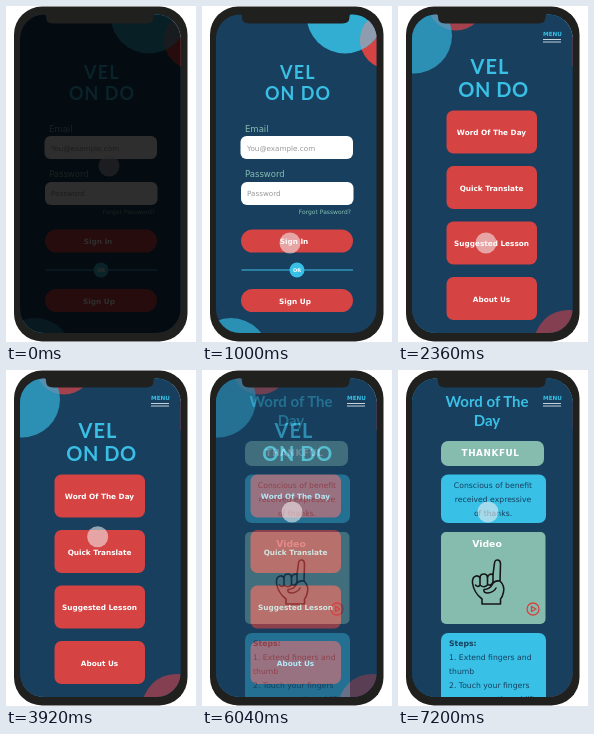
Animation, 190 px wide and 336 px high, one loop 8 s. Source, as an HTML page:

```html
<!DOCTYPE html>
<html lang="en">
<head>
<meta charset="utf-8">
<title>Phone app demo</title>
<style>
  html, body { margin: 0; width: 100%; height: 100%; overflow: hidden; background: #fff; }
  svg { display: block; width: 100vw; height: 100vh; }
  text { font-family: "DejaVu Sans", sans-serif; }
  .mid { text-anchor: middle; }
  .title, .title text { font-family: Lato, sans-serif; font-weight: 700; fill: #3abfe5; text-anchor: middle; }
  .label { font-size: 8.5px; fill: #86bdb1; }
  .hint { font-size: 7.2px; fill: #999; }
  .button { font-size: 7.3px; font-weight: 700; fill: #fff; text-anchor: middle; }
  .body { font-size: 7.7px; fill: #173f5e; }
  .navy { fill: #183f5e; }
  .red { fill: #d54343; }
  .cyan { fill: #38c0e6; }
  .green { fill: #86bcae; }
</style>
</head>
<body>
<svg viewBox="0 0 190 336" preserveAspectRatio="none">
  <defs>
    <clipPath id="screen"><rect x="14" y="8.500" width="160.500" height="318.500" rx="24"/></clipPath>
    <g id="menu">
      <text x="145" y="30" font-size="5.7" font-weight="700" fill="#38c0e6">MENU</text>
      <path d="M145 33.500h18M145 36h18" stroke="#c4d3dc" stroke-width="1"/>
    </g>
  </defs>

  <rect x="8" y="0.500" width="173.500" height="335" rx="28" fill="#20201f"/>

  <g clip-path="url(#screen)">
    <g id="login">
      <rect class="navy" width="190" height="336"/>
      <circle cx="187" cy="34" r="29" class="red"/>
      <circle cx="143" cy="9" r="38.500" fill="#31aed2"/>
      <path d="M175.500 7.500A29 29 0 0 0 167 13A29 29 0 0 0 159.500 43.500A38.500 38.500 0 0 0 175.500 29.500Z" fill="#8d9cae"/>
      <circle cx="29" cy="350" r="38" fill="#2b91b4"/>
      <text class="title" x="96" y="72.500" font-size="18" letter-spacing="1.2">VEL</text>
      <text class="title" x="96" y="93.500" font-size="18" letter-spacing="1">ON DO</text>

      <text class="label" x="43" y="125.500">Email</text>
      <rect x="38.500" y="130" width="112.500" height="23" rx="6" fill="#fff"/>
      <text class="hint" x="45" y="144.500">You@example.com</text>
      <text class="label" x="43" y="171">Password</text>
      <rect x="39" y="176" width="112.500" height="23" rx="6" fill="#fff"/>
      <text class="hint" x="45" y="189.500">Password</text>
      <text x="149" y="208" font-size="6" fill="#86bdb1" text-anchor="end">Forgot Password?</text>

      <rect class="red" x="39" y="223.500" width="112" height="23" rx="11.500"/>
      <text class="button" x="92" y="238">Sign In</text>
      <path d="M39.500 264H151" stroke="#38c0e6" stroke-width="1"/>
      <circle class="cyan" cx="95" cy="264" r="7.500"/>
      <text class="mid" x="95" y="266" font-size="5" font-weight="700" fill="#fff">OR</text>
      <rect class="red" x="39" y="283" width="112" height="23" rx="11.500"/>
      <text class="button" x="93" y="297.500">Sign Up</text>
    </g>

    <g id="home">
      <rect class="navy" width="190" height="336"/>
      <circle cx="58" cy="-4" r="28.500" fill="#a3414d"/>
      <circle cx="16" cy="29.500" r="38" fill="#36b3da" fill-opacity=".7"/>
      <circle cx="170" cy="338" r="34" fill="#843f50"/>
      <use href="#menu"/>
      <text class="title" x="92" y="68" font-size="20" letter-spacing="1">VEL</text>
      <text class="title" x="95.500" y="91" font-size="20" letter-spacing=".5">ON DO</text>
      <g id="cards"></g>
    </g>

    <g id="word">
      <rect class="navy" width="190" height="336"/>
      <use href="#menu"/>
      <g class="title" font-size="15">
        <text x="89" y="36.500">Word of The</text>
        <text x="89" y="55.500">Day</text>
      </g>
      <rect class="green" x="43" y="71" width="103" height="25" rx="7"/>
      <text class="mid" x="92.500" y="86" font-size="8.8" letter-spacing=".6" font-weight="700" fill="#fff">THANKFUL</text>

      <rect class="cyan" x="43" y="104.500" width="105" height="48.500" rx="7"/>
      <g class="body mid">
        <text x="95" y="118">Conscious of benefit</text>
        <text x="95" y="132">received expressive</text>
        <text x="95" y="146">of thanks.</text>
      </g>

      <rect class="green" x="43" y="162" width="104.500" height="92" rx="5"/>
      <text class="mid" x="89" y="177" font-size="9.3" font-weight="700" fill="#fff">Video</text>
      <g fill="none" stroke="#171717" stroke-width="1.600" stroke-linecap="round" stroke-linejoin="round">
        <path d="M84 234V229Q76 223 74.500 213Q74 207 78 206Q81 205.500 82 208Q82 204 86 204Q89 204 89.500 207Q91 203 95 204.500L96.500 193Q97 189.500 100 190Q102.500 190.500 102.500 194L102 211Q107 216 105.500 222Q104.500 227 102.500 229V234Z"/>
        <path d="M82 208V215Q80 218 77.500 215M89.500 207V215Q86 218.500 82 215M95 204.500V212Q92.500 217 89.500 214M102 211Q96 210 94 215Q92 219 86 219.500Q85 223 90 223Q96 222 98 218"/>
      </g>
      <g fill="none" stroke="#d54343" stroke-width="1.300" stroke-linejoin="round">
        <circle cx="135" cy="239" r="6"/>
        <path d="M133.500 236.500L138 239L133.500 241.500Z"/>
      </g>

      <rect class="cyan" x="43" y="263" width="105" height="90" rx="7"/>
      <g class="body">
        <text x="51" y="276" font-weight="700">Steps:</text>
        <text x="51" y="290">1. Extend fingers and</text>
        <text x="51" y="304">thumb</text>
        <text x="51" y="318">2. Touch your fingers</text>
        <text x="51" y="332">on your mouth and lift</text>
      </g>
    </g>

    <circle id="touch" r="10.500" fill="#f6f0f0" fill-opacity=".56"/>
    <rect id="shade" width="190" height="336"/>
  </g>

  <path d="M38 6V8Q40 8 40 11Q40 17.500 47 17.500H140.500Q147.500 17.500 147.500 11Q147.500 8 149.500 8V6Z" fill="#20201f"/>
</svg>

<script>
const LOOP = 8000;
const $ = id => document.getElementById(id);

$('cards').innerHTML = ['Word Of The Day', 'Quick Translate', 'Suggested Lesson', 'About Us']
  .map((label, i) => {
    const y = 104.5 + i * 55.5;
    return `<rect class="red" x="48.500" y="${y}" width="90.500" height="43" rx="7"/>
      <text class="button" x="93.500" y="${y + 24.5}">${label}</text>`;
  }).join('');

const progress = (t, start, length) => Math.min(1, Math.max(0, (t - start) / length));
const easeOut = u => 1 - (1 - u) ** 3;
const smooth = u => u * u * (3 - 2 * u);

function draw(t) {
  const down = smooth(progress(t, 40, 800));
  const up = smooth(progress(t, 3275, 970));
  $('touch').setAttribute('cx', 103 - 15 * down + 2 * up + 3 * Math.sin(Math.PI * up));
  $('touch').setAttribute('cy', 160 + 77 * down - 95 * up);
  $('shade').setAttribute('opacity', 0.82 * (1 - progress(t, 0, 840)) ** 2);
  $('home').setAttribute('opacity', easeOut(progress(t, 1715, 645)));
  $('word').setAttribute('opacity', easeOut(progress(t, 5920, 820)));
}

function tick() {
  draw(performance.now() % LOOP);
  requestAnimationFrame(tick);
}
tick();
</script>
</body>
</html>
```
